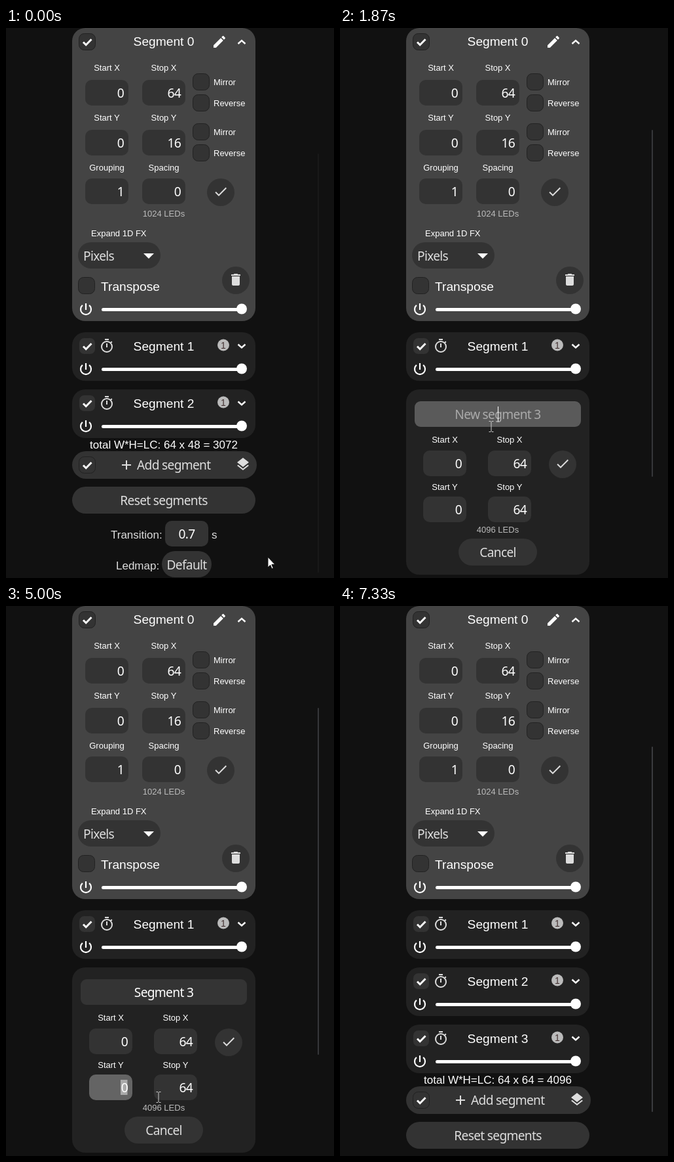
An HTML page that plays this animation: 501x837 px, repeating every 7870 ms.

```html
<!DOCTYPE html>
<html lang="en">
<head>
<meta charset="utf-8">
<title>Add segment</title>
<style>
  html, body { margin: 0; width: 100%; height: 100%; overflow: hidden; background: #111; }
  svg { display: block; width: 501px; height: 837px; }
  text { fill: #fff; font-family: "Liberation Sans", Arial, sans-serif; white-space: pre; }
  .label { font-size: 13px; }
  .body { font-size: 17px; }
  .title { font-size: 19.2px; }
  .ui { font: 19.2px "Noto Sans", Tahoma, sans-serif; letter-spacing: -.7px; }
  .mid { text-anchor: middle; }
  .end { text-anchor: end; }
  .soft { fill: #ddd; }
  .count { fill: #bbb; }
  .box { fill: #333; }
  .line { fill: none; stroke: #fff; stroke-width: 2; }
</style>
</head>
<body>
<svg id="stage" viewBox="0 0 501 837"></svg>
<script>
const LOOP = 7870;
const stage = document.getElementById('stage');
const $ = id => document.getElementById(id);

// Drawing helpers, all returning SVG markup
const text = (x, y, s, cls, id = '') => `<text x="${x}" y="${y}" class="${cls}" id="${id}">${s}</text>`;
const box = (x, y, w, h, r, attrs = 'class="box"') =>
  `<rect x="${x}" y="${y}" width="${w}" height="${h}" rx="${r}" ${attrs}/>`;
const at = (x, y, inner) => `<g transform="translate(${x} ${y})">${inner}</g>`;
const line = (d, width = 2, color = '#fff') =>
  `<path class="line" d="${d}" style="stroke-width:${width};stroke:${color}"/>`;
const icon = (x, y, d, color = '#ddd') => at(x - 12, y - 12, `<path d="${d}" fill="${color}"/>`);
const group = (id, inner) => `<g id="${id}">${inner}</g>`;

const PENCIL = 'M3 17.25V21h3.75L17.81 9.94l-3.75-3.75zM20.71 7.04c.39-.39.39-1.02 0-1.41l-2.34-2.34c-.39-.39-1.02-.39-1.41 0l-1.83 1.83 3.75 3.75z';
const TRASH = 'M6 19c0 1.1.9 2 2 2h8c1.1 0 2-.9 2-2V7H6zM19 4h-3.5l-1-1h-5l-1 1H5v2h14z';
const LAYERS = 'M12 18.5l-7.4-5.7L3 14l9 7 9-7-1.6-1.2zM12 16l9-7-9-7-9 7z';
const TICK = 'M9 16.2L4.8 12l-1.4 1.4L9 19 21 7l-1.4-1.4z';

const checkbox = (x, y, on) => at(x, y,
  box(-12.5, -12.5, 25, 25, 8, 'fill="#333" stroke="#222"') + (on ? line('M-6 .5l4.2 4.2 8.3-8.4', 3) : ''));
const roundButton = (x, y, shape, id = '') =>
  `<circle cx="${x}" cy="${y}" r="21" class="box" id="${id}"/>` + icon(x, y - 1, shape);
const slider = y => at(122, y, line('M0-9v10M5.1-6.1a8 8 0 1 1-10.2 0', 2.2)) +
  at(0, y + .5, line('M148.5 0h212', 5) + '<circle cx="148.5" r="2.5" fill="#fff"/>' +
  '<circle cx="360" cy="-1" r="8" fill="#fff"/>');
const field = (x, y, label, value, labelGap = 14, id = '') =>
  text(x + 33, y - labelGap, label, 'label mid') +
  box(x, y, 66, 39, 10, `class="box" id="${id && id + 'Box'}"`) +
  text(x + 59, y + 27, value, 'ui end', id);
const option = (y, label) => checkbox(298, y, false) + text(317, y + 5, label, 'label');
const stopwatch = '<circle class="line" cy="1" r="8" style="stroke:#ddd"/>' +
  line('M-3-10h6M0-4v6M5.8-4.8l2-2', 2, '#ddd');

const segment = n => at(0, 376 + 87 * n,
  box(101, 0, 280, 74, 20, 'fill="#222"') + checkbox(124, 21, true) + at(154, 21, stopwatch) +
  text(241, 28, `Segment ${n}`, 'title mid') +
  '<circle cx="332" cy="19.5" r="9" fill="#bbb"/>' +
  '<text x="332" y="24.5" class="mid" font-size="14" style="fill:#433">1</text>' +
  at(360, 21, line('M-5.5-2.5l5.5 5 5.5-5', 2.4)) + slider(56));

const expanded =
  box(101, 0, 280, 446, 20, 'fill="#444"') +
  checkbox(124, 21, true) + text(241, 27, 'Segment 0', 'title mid') +
  icon(326, 21, PENCIL, '#fff') + at(360, 21, line('M-5.5 3l5.5-5 5.5 5', 2.4)) +
  field(121, 79, 'Start X', 0) + field(208, 79, 'Stop X', 64) +
  field(121, 155, 'Start Y', 0) + field(208, 155, 'Stop Y', 16) +
  field(121, 229, 'Grouping', 1, 12) + field(208, 229, 'Spacing', 0, 12) +
  option(82, 'Mirror') + option(114, 'Reverse') + option(158, 'Mirror') + option(190, 'Reverse') +
  roundButton(328, 250, TICK) +
  text(241, 287, '1024 LEDs', 'label mid count') +
  text(130, 317, 'Expand 1D FX', 'label') +
  box(110, 326, 126, 40, 20) + text(118, 354, 'Pixels', 'ui soft') +
  '<path d="M210 343h16l-8 8z" fill="#fff"/>' +
  checkbox(123, 392, false) + text(145, 400, 'Transpose', 'title') +
  roundButton(351, 384, TRASH) + slider(428);

const footer =
  text(241, 640, 'total W*H=LC: 64 x 48 = 3072', 'body mid', 'total') +
  box(101, 644, 282, 42, 21, 'class="box" id="add"') + checkbox(124, 665, true) +
  at(184, 665, line('M-7 0h14M0-7v14', 2, '#ddd')) +
  text(200, 672, 'Add segment', 'ui soft') + icon(362, 664, LAYERS) +
  box(101, 698, 280, 41, 20.5, 'class="box" id="reset"') + text(241, 726, 'Reset segments', 'ui soft mid') +
  text(160, 777, 'Transition:', 'body soft') + box(243, 750, 66, 39, 10) +
  text(276, 777, '0.7', 'ui mid') + text(314, 777, 's', 'body soft') +
  text(168, 824, 'Ledmap:', 'body soft') + box(238, 796, 76, 40, 20) +
  text(276, 824, 'Default', 'ui soft mid');

const form =
  box(101, 550, 280, 282, 20, 'fill="#222"') +
  box(114, 568, 254, 39, 9, 'class="box" id="nameBox"') +
  text(241, 595, '', 'ui mid', 'name') +
  field(127, 643, 'Start X', 0, 12) + field(226, 643, 'Stop X', 64, 12) +
  field(127, 713, 'Start Y', 0, 10, 'startY') + field(226, 713, 'Stop Y', 64, 10) +
  group('selection', box(175, 721, 10.5, 23, 0, 'fill="#aaa"') + text(186, 740, '0', 'ui end')) +
  '<rect id="caret" width="1" height="23" fill="#fff"/>' +
  roundButton(340, 664, TICK, 'confirm') +
  text(241, 768, '', 'label mid count', 'leds') +
  box(181, 777, 120, 41, 20.5) + text(241, 805, 'Cancel', 'ui soft mid');

const pointerShape = (id, d) => `<path id="${id}" d="${d}" fill="#fff" stroke="#111"/>`;
const cursor =
  pointerShape('arrow', 'M0 0v16l3.7-3.6 2.4 5.6 2.2-1-2.4-5.4h5z') +
  pointerShape('hand', 'M-2 2a2 2 0 0 1 4 0v5.5l6 1.3c1.5.4 2 1.2 2 2.7v4c0 1.5-1 2.5-1.5 3.5v3h-9v-2.5l-4.5-6c-1-1.5-2-2.5-1.3-3.4 1-1.2 2.6-.3 4.3 1.7z') +
  '<path id="beam" d="M-3.5-7.5h2.5l1 1 1-1h2.5M0-6.5v14M-3.5 8.5h2.5l1-1 1 1h2.5" fill="none" stroke="#ccc"/>';

stage.innerHTML = expanded + segment(1) +
  group('second', segment(2)) + group('third', segment(3)) +
  group('footer', footer) + group('form', form) +
  '<rect id="scrollbar" x="476" y="191" width="2" height="638" rx="1"/>' +
  group('cursor', cursor);

// Motion: keys are [ms, value] pairs, the first at 0
const track = (id, prop, keys, easing = 'linear') => {
  const frames = [...keys, [LOOP, keys.at(-1)[1]]]
    .map(([ms, v]) => ({ offset: ms / LOOP, [prop]: v, easing }));
  return $(id).animate(frames, { duration: LOOP, iterations: Infinity });
};
const jump = (id, prop, keys) => track(id, prop, keys, 'steps(1, end)');
const showDuring = (id, ...spans) => {
  const keys = spans.flatMap(([from, to]) => [[from, 1], [to, 0]]).filter(([ms]) => ms < LOOP);
  return jump(id, 'opacity', keys[0][0] ? [[0, 0], ...keys] : keys);
};

const OPEN = 1130, SAVE = 6650, NAME_FOCUS = 1740, Y_FOCUS = 4670, Y_BLUR = 6370;
const clock = showDuring('form', [OPEN, SAVE]);
showDuring('second', [0, OPEN], [SAVE, LOOP]);
showDuring('footer', [0, OPEN], [SAVE, LOOP]);
showDuring('third', [SAVE, LOOP]);
jump('footer', 'transform', [[0, 'translateY(0px)'], [SAVE, 'translateY(87px)']]);

jump('scrollbar', 'y', [[0, '191px'], [OPEN, '155px'], [SAVE, '214px']]);
jump('scrollbar', 'height', [[0, '638px'], [OPEN, '528px'], [SAVE, '556px']]);
track('scrollbar', 'fill', [[0, '#191919'], [70, '#191919'], [400, '#414245'], [1130, '#414245'],
  [1600, '#36373a'], [6530, '#36373a'], [6900, '#3b3c3f']]);

track('add', 'fill', [[0, '#333'], [560, '#333'], [800, '#555'], [OPEN, '#555'], [1200, '#333'],
  [6930, '#333'], [7000, '#444'], [7200, '#333']]);
track('reset', 'fill', [[0, '#333'], [7070, '#333'], [7160, '#444'], [7330, '#333']]);
track('nameBox', 'fill', [[0, '#333'], [1670, '#333'], [1930, '#666'], [Y_FOCUS, '#666'], [5000, '#343434'], [5130, '#333']]);
track('startYBox', 'fill', [[0, '#333'], [4600, '#333'], [4930, '#646464'], [Y_BLUR, '#646464'], [SAVE, '#333']]);
track('confirm', 'fill', [[0, '#333'], [6270, '#333'], [6470, '#555']]);
showDuring('selection', [4800, 5730]);
showDuring('caret', [NAME_FOCUS, Y_FOCUS], [5730, Y_BLUR]);

const path = [[0, 400, 805], [70, 396, 803], [760, 230, 668], [1200, 230, 668], [1600, 231, 622],
  [1750, 231, 606], [4180, 231, 606], [4670, 174, 738], [4800, 188, 743], [4930, 222, 749],
  [5000, 233, 747], [5130, 237, 747], [5900, 237, 747], [6400, 342, 660], [6700, 342, 660], [7270, 322, 842]];
track('cursor', 'transform', path.map(([ms, x, y]) => [ms, `translate(${x}px, ${y}px)`]), 'ease-in-out');
showDuring('arrow', [0, 670], [1400, 1670], [4330, 4600], [4900, 4970], [6030, 6300], [SAVE, 6950]);
showDuring('hand', [670, OPEN], [6300, SAVE], [6950, 7270]);
showDuring('beam', [OPEN, 1400], [1670, 2130], [4200, 4330], [4600, 4900], [4970, 5330], [5900, 6030]);

// Typing
const NAME = 'Segment 3';
const nameTimes = [2130, 2400, 2600, 2870, 2970, 3070, 3200, 3400, 3800];
const yTimes = [5730, 5870];
const typed = (value, times, t) => value.slice(0, times.filter(ms => ms <= t).length);

const setText = (id, s) => { if ($(id).textContent !== s) $(id).textContent = s; };

function render() {
  const t = (clock.currentTime || 0) % LOOP;
  const name = typed(NAME, nameTimes, t);
  const startY = typed('48', yTimes, t) || '0';
  setText('name', name || 'New segment 3');
  $('name').style.fill = name ? '#fff' : '#aaa';
  setText('startY', startY);
  setText('leds', `${64 * (64 - startY)} LEDs`);
  setText('total', `total W*H=LC: 64 x ${t < SAVE ? '48 = 3072' : '64 = 4096'}`);

  const inName = t < Y_FOCUS;
  const nameEnd = name ? $('name').getComputedTextLength() / 2 : 0;
  $('caret').setAttribute('x', inName ? Math.round(241 + nameEnd) : 187);
  $('caret').setAttribute('y', inName ? 576 : 721);
  requestAnimationFrame(render);
}
render();
</script>
</body>
</html>
```
